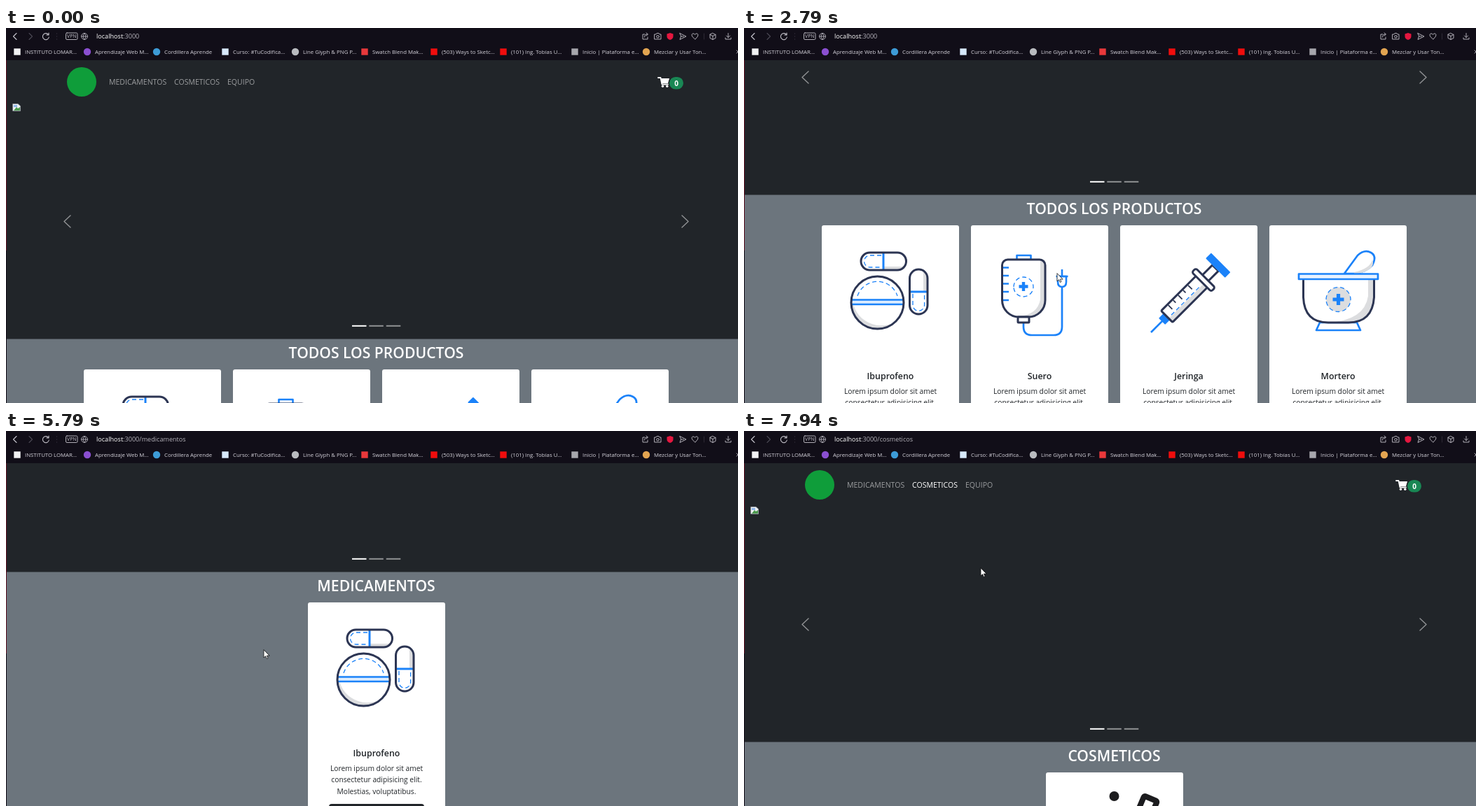
An HTML page with a canvas that plays this animation: 1045x536 px, repeating every 8000 ms.

```html
<!DOCTYPE html>
<html lang="es">
<head>
<meta charset="utf-8">
<title>Farmacia</title>
<style>
html, body { margin: 0; width: 100%; height: 100%; overflow: hidden; background: #212529; }
canvas { display: block; }
</style>
</head>
<body>
<canvas id="stage" width="1045" height="536"></canvas>
<script>
const ctx = document.getElementById('stage').getContext('2d');
const LOOP = 8000;
const NAVY = '#2c3553', BLUE = '#1b82f9', SHADE = '#dcdddf', DARK = '#212529', INK = '#1c1c1e';
const FAMILY = '"Open Sans", "Noto Sans", sans-serif';

// Runs of redraws: first, last, count
const BURSTS = [
  [120, 900, 12], [970, 1180, 4], [1370, 1650, 5], [2440, 3120, 10], [3270, 4060, 13],
  [4190, 4980, 13], [5050, 5250, 4], [5730, 6520, 13], [6600, 7400, 13], [7550, 7940, 7]
];
const SCROLL = [
  [50, 0], [900, 212], [1180, 272], [1370, 298], [1650, 409], [2440, 409], [3050, 0],
  [4650, 0], [4980, 118], [5250, 272], [5680, 272], [6150, 0], [6850, 0], [7400, 272],
  [7500, 272], [7880, 0]
];
const POINTER = [
  [120, 447, 351], [3210, 447, 351], [3731, 225, 97], [3990, 187, 76], [4330, 187, 76],
  [4760, 368, 313], [6080, 368, 313], [6450, 270, 77], [6620, 270, 77], [6800, 328, 221],
  [7680, 328, 221], [7940, 338, 196]
];
const NAV = [['MEDICAMENTOS', 147, 83], ['COSMETICOS', 240, 66], ['EQUIPO', 316, 39]];

function sample(t) {
  let now = 0;
  for (const [a, b, n] of BURSTS) {
    if (t < a) break;
    const step = (b - a) / (n - 1);
    now = a + step * Math.min(n - 1, Math.floor((t - a) / step + 1e-6));
  }
  return now;
}

function track(keys, t) {
  const i = keys.findIndex(k => k[0] > t);
  if (i < 0) return keys[keys.length - 1].slice(1);
  if (i === 0) return keys[0].slice(1);
  const p = keys[i - 1], q = keys[i], u = (t - p[0]) / (q[0] - p[0]);
  return p.slice(1).map((v, j) => Math.round(v + (q[j + 1] - v) * u));
}

// Drawing helpers
function paint(fill, stroke, width = 3) {
  if (fill) { ctx.fillStyle = fill; ctx.fill(); }
  if (stroke) { ctx.strokeStyle = stroke; ctx.lineWidth = width; ctx.stroke(); }
}
function rect(x, y, w, h, r, fill, stroke, width) {
  ctx.beginPath();
  ctx.roundRect(x, y, w, h, r);
  paint(fill, stroke, width);
}
function disc(x, y, r, fill, stroke, width) {
  ctx.beginPath();
  ctx.arc(x, y, r, 0, 7);
  paint(fill, stroke, width);
}
function path(d, fill, stroke, width) {
  const p = new Path2D(d);
  if (fill) { ctx.fillStyle = fill; ctx.fill(p); }
  if (stroke) { ctx.strokeStyle = stroke; ctx.lineWidth = width || 3; ctx.stroke(p); }
}
function dashed(d) {
  ctx.setLineDash([6, 4]);
  path(d, null, BLUE, 1.3);
  ctx.setLineDash([]);
}
function plus(x, y, r, w) {
  path(`M${x - r} ${y}h${2 * r}M${x} ${y - r}v${2 * r}`, null, BLUE, w);
}
function placed(x, y, angle, draw) {
  ctx.save();
  ctx.translate(x, y);
  ctx.rotate(angle);
  draw();
  ctx.restore();
}
function text(s, x, y, size, color, align = 'left', weight = 400) {
  ctx.font = `${weight} ${size}px ${FAMILY}`;
  ctx.textAlign = align;
  ctx.fillStyle = color;
  ctx.fillText(s, x, y);
}

// Product pictures, relative to the card corner
function pills() {
  rect(56, 39, 64.5, 25, 12.5, '#fff');
  path('M88 59H117Q113 64 108 64H88z', SHADE);
  dashed('M85 43H69a8.5 8.5 0 0 0 0 17H85');
  path('M88 39v25', null, BLUE);
  rect(56, 39, 64.5, 25, 12.5, null, NAVY);
  rect(125.5, 63, 25.5, 64, 12.7, '#fff');
  path('M145 66q6 4 6 10V95h-6z', SHADE);
  dashed('M130 98v16a8.3 8.3 0 0 0 16.6 0V98');
  path('M125.5 95h25.5', null, BLUE);
  rect(125.5, 63, 25.5, 64, 12.7, null, NAVY);
  disc(79.5, 110.5, 37.5, '#fff');
  path('M44 98A37.5 37.5 0 0 0 105 138A41 41 0 0 1 44 98z', SHADE);
  dashed('M51 101a30 30 0 0 1 57 0');
  rect(42, 107, 75, 6, 0, '#dcecff');
  path('M42 106.5h75M42 113h75', null, BLUE, 2.6);
  disc(79.5, 110.5, 37.5, null, NAVY);
}
function serum() {
  rect(65.5, 43, 20, 6, 0, '#fff', BLUE, 2.6);
  rect(44.5, 49, 61.5, 82, [8, 8, 24, 24], '#fff');
  path('M99 50q7 0 7 8V108q0 22-22 22H68q27-2 31-24z', SHADE);
  path('M46 60.5h8M46 72h8M46 83.5h8M46 95h8M46 107h8', null, BLUE, 2.4);
  rect(44.5, 49, 61.5, 82, [8, 8, 24, 24], null, NAVY);
  dashed('M61 88a14 14 0 1 1 28 0a14 14 0 1 1-28 0');
  plus(75, 87.5, 6.5, 4.4);
  path('M75 139v6q0 12 12 12h31q12 0 12-12V89', null, BLUE, 2.7);
  rect(67, 131, 16, 8, 1, '#fff', NAVY);
  path('M124 73v8q0 7 6 7t6-7v-8z', '#fff', BLUE, 2.6);
  path('M121.500 73h17M130 63v10', null, BLUE, 2.6);
}
function syringe() {
  placed(44, 153, -Math.PI / 4, () => {
    path('M0 0H26', null, BLUE, 2.7);
    rect(22, -6.5, 12, 13, 1, BLUE);
    rect(32, -11.5, 72, 23, 2, '#fff');
    rect(33, 4, 70, 7, 0, SHADE);
    path('M45-10v8M55-10v5M65-10v8M75-10v5M85-10v8', null, NAVY, 1.8);
    dashed('M38 3H96');
    rect(32, -11.5, 72, 23, 2, null, NAVY);
    rect(106, -6, 24, 12, 0, '#fff', NAVY);
    rect(102, -19.5, 8, 39, 3, '#fff', NAVY);
    rect(130, -19.5, 11, 39, 1, BLUE);
  });
}
function mortar() {
  path('M107 69L126 43Q136 34 145 39T147 57Q139 66 122 69z', '#fff', BLUE, 2.7);
  path('M121 67Q144 62 147 49Q151 58 141 64T121 69z', SHADE);
  path('M72 139h53l5 11H67z', '#fff', BLUE, 2.7);
  path('M48.5 77V103Q50 139 84 139H113Q147 139 149.5 103V77z', '#fff');
  path('M141 78h8V104Q146 139 113 139H84Q136 136 141 101z', SHADE);
  path('M48.5 77V103Q50 139 84 139H113Q147 139 149.5 103V77', null, NAVY);
  rect(42, 69.5, 113, 7.5, 0, '#e8f2ff', BLUE, 2.7);
  disc(98.5, 106, 17.5, SHADE);
  dashed('M81 106a17.5 17.5 0 1 1 35 0a17.5 17.5 0 1 1-35 0');
  plus(98.5, 106, 8, 5.2);
}
function bandage() {
  for (const a of [1, -1]) placed(98, 98, a * Math.PI / 4, () => {
    rect(-54, -22, 108, 44, 22, '#fff');
    rect(-50, 13, 100, 8, 4, SHADE);
    dashed('M-24-16h-8a16 16 0 0 0 0 32h8M24-16h8a16 16 0 0 1 0 32h-8');
    rect(-54, -22, 108, 44, 22, null, NAVY, 2.5);
    if (a < 0) rect(-22, -22, 44, 44, 0, '#fff', BLUE, 2.5);
  });
  plus(98, 98, 10, 6);
}
function dropper() {
  const tube = 'M-4-10H-74Q-85-5-104-3V3Q-85 5-74 10H-4z';
  placed(131, 60, -Math.PI / 4, () => {
    path('M2-9H18Q29-9 29 0T18 9H2z', '#fff', BLUE, 2.6);
    path('M4 8Q25 8 26 0Q29 8 18 9z', SHADE);
    path(tube, '#fff');
    path('M-36-9H-74Q-85-5-104-3V3Q-85 5-74 9H-36z', SHADE);
    path('M-20-9v7M-32-9v7M-44-9v7M-56-9v7', null, BLUE, 1.8);
    dashed('M-16 5H-76');
    path(tube, null, NAVY, 2.6);
    rect(-5, -20, 8, 40, 4, '#fff', NAVY, 2.6);
  });
}
function makeup() {
  disc(97.5, 34, 7, INK);
  placed(77, 88, -0.17, () => {
    path('M-9-1V-25Q-8-35-1-30Q9-22 9-10V-1z', null, INK, 7);
    path('M-12 4H13V22H-12z M-17 22H18V58H-17z', null, INK, 7);
  });
  placed(143, 53, 0.4, () => {
    rect(-10, -17, 20, 39, 2, null, INK, 8);
    path('M-11 23Q-20 30-20 44V80Q-20 86-14 86H14Q20 86 20 80V44Q20 30 11 23', null, INK, 8);
    path('M-12 58Q-2 50 10 58', null, INK, 5);
  });
}

const ROWS = [
  [['Ibuprofeno', pills], ['Suero', serum], ['Jeringa', syringe], ['Mortero', mortar]],
  [['Curitas', bandage], ['Gotero', dropper], ['Maquillaje', makeup]]
];
const PAGES = [
  { from: 0, url: '', title: 'TODOS LOS PRODUCTOS', rows: ROWS },
  { from: 4190, url: '/medicamentos', title: 'MEDICAMENTOS', rows: [[ROWS[0][0]]] },
  { from: 6600, url: '/cosmeticos', title: 'COSMETICOS', rows: [[ROWS[1][2]]] }
];

function card(x, y, [name, picture]) {
  placed(x, y, 0, () => {
    rect(0, 0, 196, 326, 3, '#fff');
    ctx.lineCap = 'butt';
    ctx.lineJoin = 'round';
    picture();
    text(name, 98, 220, 12.4, DARK, 'center', 600);
    ['Lorem ipsum dolor sit amet', 'consectetur adipisicing elit.', 'Molestias, voluptatibus.']
      .forEach((line, i) => text(line, 98, 240.8 + i * 16.4, 10.26, DARK, 'center'));
    rect(30, 288, 136, 26.5, 4, DARK);
    text('Ver Detalle del Producto', 98, 305.3, 10.26, '#fff', 'center');
  });
}

function navbar(active, hover) {
  disc(108, 77, 21, '#0f9d3a');
  NAV.forEach(([label, x], i) => {
    const color = i === active ? '#fff' : i === hover ? '#c8c9ca' : '#9b9d9f';
    text(label, x, 81.3, 10.54, color);
  });
  path('M931 71h3.5l2 9.5h8.5', null, '#fff', 1.8);
  path('M935 72h12l-2 7h-9z', '#fff');
  disc(937.5, 83.3, 1.7, '#fff');
  disc(943.8, 83.3, 1.7, '#fff');
  rect(947, 70, 20, 17.5, 8.7, '#198754');
  text('0', 957, 82.5, 10, '#fff', 'center', 700);
}

function carousel() {
  path('M10 108.5h7l3.5 3V118.5H10z', '#eef1f4', '#9aa0a6', 0.8);
  path('M11 118l4-5 2 2 3-2v5z', '#4c9a4e');
  path('M11 110h5v3h-5z', '#8fb6e8');
  path('M92 268L83 276.5L92 285M965 268L974 276.5L965 285', null, '#909294', 1.4);
  [494, 518.3, 542.8].forEach((x, i) => rect(x, 424.8, 20.5, 2, 0, i ? '#909294' : '#fff'));
}

function shop(page, scroll, hover) {
  ctx.save();
  ctx.beginPath();
  ctx.rect(1, 46, 1044, 490);
  ctx.clip();
  ctx.translate(0, -scroll);
  rect(0, 46, 1045, 399, 0, DARK);
  rect(0, 444.5, 1045, 1000, 0, '#6c757d');
  navbar(PAGES.indexOf(page) - 1, hover);
  carousel();
  text(page.title, 528.5, 471.8, 21.15, '#fff', 'center', 600);
  page.rows.forEach((row, r) => row.forEach((item, i) =>
    card(Math.round(537 + (i - row.length / 2) * 213), 488 + r * 337, item)));
  ctx.restore();
}

const BOOKMARKS = [
  [16, 27, 'INSTITUTO LOMAR...', '#f2f2f4', 0], [116, 127, 'Aprendizaje Web M...', '#8a4fd0', 1],
  [215, 226, 'Cordillera Aprende', '#3d9bd6', 1], [313, 324, 'Curso: #TuCodifica...', '#d7e9fb', 0],
  [413, 424, 'Line Glyph & PNG P...', '#b9bbbf', 1], [512, 523, 'Swatch Blend Mak...', '#e8383b', 0],
  [611, 622, '(503) Ways to Sketc...', '#f00d0d', 0], [710, 721, '(101) Ing. Tobías U...', '#f00d0d', 0],
  [812, 823, 'Inicio | Plataforma e...', '#a7a7ad', 0], [914, 925, 'Mezclar y Usar Ton...', '#e2a451', 1]
];

function browser(url) {
  rect(0, 0, 1045, 46, 0, '#110e18');
  const line = '#c3c1c9';
  ctx.lineCap = ctx.lineJoin = 'round';
  path('M15 7.5L10.5 12L15 16.5', null, line, 1.1);
  path('M33 7.5L37.5 12L33 16.5', null, '#4b4853', 1.1);
  path('M60.5 9.5A4.5 4.5 0 1 0 61.3 13M61 7v3h-3', null, line, 1.1);
  path('M72.5 8v.1M72.5 12v.1M72.5 16v.1', null, '#45424d', 1);
  rect(85.5, 7, 16.5, 9.5, 1.5, null, line, 0.9);
  text('VPN', 93.8, 14.4, 7, line, 'center');
  path('M107.5 12a4.5 4.5 0 1 0 9 0a4.5 4.5 0 1 0-9 0h9M112 7.5q-4 4.5 0 9q4-4.5 0-9', null, line, 0.8);
  text('localhost', 129, 15.2, 9.1, '#fff');
  const host = ctx.measureText('localhost').width;
  text(':3000' + url, 129 + host, 15.2, 9.1, '#b4b2ba');
  path('M912 9h-3v7h7v-3M911.5 13q0-4 4-4M914 7l2.5 2l-2.5 2', null, line, 0.9);
  path('M926 9h2l1-1.5h3l1 1.5h2v7h-9z', null, line, 0.9);
  disc(930.5, 12.3, 1.8, null, line, 0.9);
  path('M948 7l4.5 1.5V12q0 3.5-4.5 5q-4.5-1.5-4.5-5V8.5z', '#e5173f');
  path('M962 7.5L971 12L962 16.5L963.5 12zM963.5 12h4', null, line, 0.9);
  path('M983.5 16L979.8 12.2Q978 9 980.5 8Q982.5 7.5 983.5 9.5Q984.5 7.5 986.5 8Q989 9 987.2 12.2z', null, line, 0.9);
  path('M996.5 8v8', null, '#35323d', 0.8);
  path('M1009 7.5l4 2v5l-4 2l-4-2v-5zM1005 9.5l4 2l4-2M1009 11.5v5', null, line, 0.9);
  path('M1031 7.5v6M1028.5 11l2.5 2.5l2.5-2.5M1027 14v2h8v-2', null, line, 0.9);
  for (const [x, tx, label, color, round] of BOOKMARKS) {
    if (round) disc(x, 34, 5.2, color);
    else rect(x - 4.7, 29.3, 9.4, 9.4, 0, color);
    text(label, tx, 36.8, 7.8, '#d6d4dc');
  }
  path('M1043 32l2 2l-2 2', null, line, 0.9);
}

function cursor(x, y, hand) {
  placed(x, y, 0, () => {
    if (hand) {
      path('M-1 1Q0-1 1 1V6L6 7Q8 7.5 7.5 10L6.5 14H0L-4 9Q-4 7-1 9z', '#fff', '#000', 0.8);
    } else {
      path('M0 0V11L2.6 8.7L4.3 12.5L6 11.7L4.4 8.1H7.8z', '#fff', '#111', 0.8);
    }
  });
}

function draw(t) {
  const now = sample(t);
  const page = PAGES.filter(p => p.from <= now).pop();
  const [scroll] = track(SCROLL, now);
  const [x, y] = track(POINTER, now);
  const overNav = scroll < 1 && y > 66 && y < 90;
  const hover = overNav ? NAV.findIndex(([, left, w]) => x >= left && x <= left + w) : -1;
  shop(page, scroll, hover);
  browser(page.url);
  rect(0, 0, 1, 536, 0, '#120d18');
  rect(0, 46, 1, 272, 0, '#5a1020');
  if (now >= 120) cursor(x, y, hover >= 0);
}

function tick() {
  draw(performance.now() % LOOP);
  requestAnimationFrame(tick);
}
tick();
</script>
</body>
</html>
```
